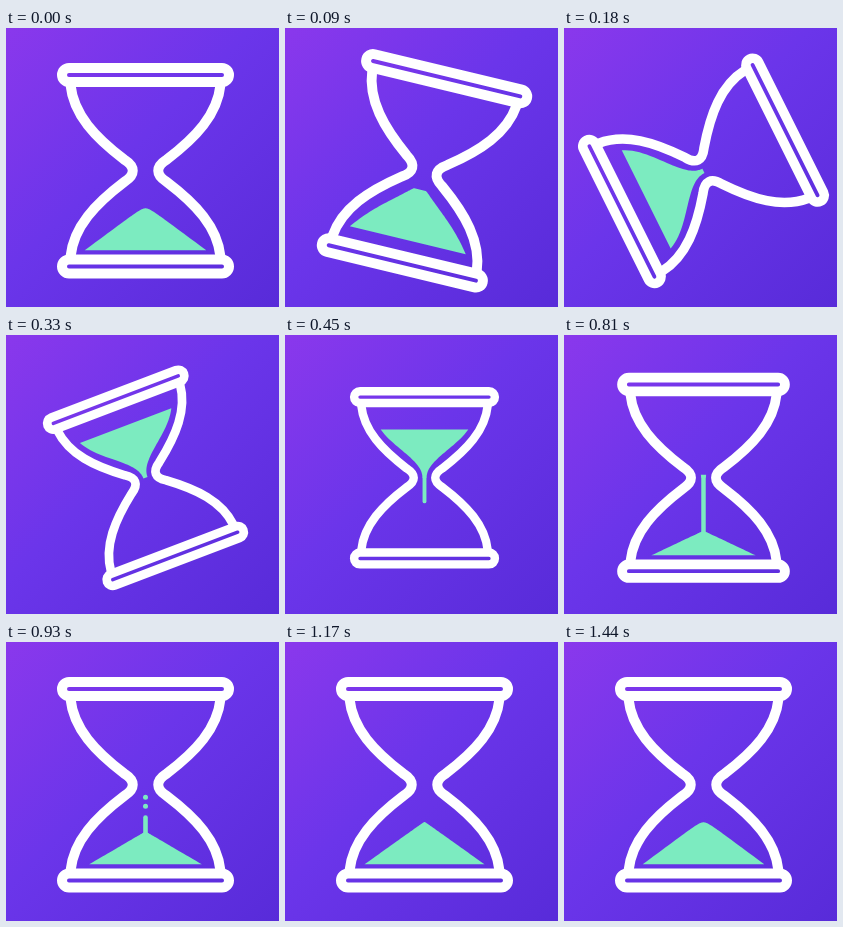
These frames come from a looping animation (273 px wide and 279 px high, 1.47 s). An HTML page:

```html
<!DOCTYPE html>
<html lang="en">
<head>
<meta charset="utf-8">
<title>Hourglass</title>
<style>
  html, body { margin: 0; width: 100%; height: 100%; overflow: hidden; }
  body { background: linear-gradient(135deg, #8a38ec, #6b35ea 45%, #582bd9); }
  svg { display: block; width: 100%; height: 100%; }
  .glass { fill: none; stroke: #fff; stroke-width: 10; }
  .sand { fill: #7cebc0; }
  #stream { stroke: #7cebc0; stroke-width: 4.6; stroke-linecap: round; }
</style>
</head>
<body>
<svg viewBox="0 0 273 279">
  <defs>
    <path id="side" d="M-75-86C-72-56-50-33-21-11C-10-4-10 4-21 11C-50 33-72 56-75 86"/>
    <rect id="bar" x="-83.5" y="-102.7" width="167" height="14" rx="7"/>
  </defs>
  <g id="timer">
    <path id="upper" class="sand"/>
    <path id="pile" class="sand"/>
    <line id="stream" x1="0" x2="0"/>
    <circle class="sand dot" r="2.5"/>
    <circle class="sand dot" r="2.5"/>
    <g class="glass">
      <use href="#side"/>
      <use href="#side" transform="scale(-1 1)"/>
      <use href="#bar"/>
      <use href="#bar" transform="scale(1 -1)"/>
    </g>
  </g>
</svg>
<script>
const LOOP = 1470, STEP = 30;
const HEIGHT = 45.5, BASE = 79.5, ROUND = 3.5;
const $ = id => document.getElementById(id);
const dots = document.querySelectorAll('.dot');

const part = (t, a, b) => Math.min(1, Math.max(0, (t - a) / (b - a)));
const ease = (t, a, b) => { const u = part(t, a, b); return u * u * (3 - 2 * u); };
const mix = (a, b, u) => a + (b - a) * u;
const show = (el, on) => el.setAttribute('visibility', on ? 'visible' : 'hidden');

// Half width of the sand room at distance y from the neck
const room = y => 2.5 + 61 * (1 - Math.exp(-Math.pow(Math.max(0, y) / 45, 2.1)));

// Half width of a heap with its tip at a, rounded by r
function heap(y, a, r, base, half) {
  const d = y - a;
  return half * Math.sqrt(Math.max(0, d * d - r * r)) / (base - a);
}

// Symmetric outline between two heights
function outline(from, to, width, sign) {
  const left = [], right = [], n = 40;
  for (let i = 0; i <= n; i++) {
    const u = i / n, y = mix(from, to, u * u), w = width(y);
    left.push(`${(-w).toFixed(2)} ${(sign * y).toFixed(2)}`);
    right.unshift(`${w.toFixed(2)} ${(sign * y).toFixed(2)}`);
  }
  return 'M' + left.concat(right).join('L') + 'Z';
}

function drawUpper(t) {
  const level = t < 330
    ? 64 + 15.5 * (1 - t / 330) ** 2
    : 64 - 38.5 * ((t - 330) / 360) ** 1.6;
  show($('upper'), level > 0);
  if (level <= 0) return;
  const m = ease(t, 0, 185);
  const tip = (BASE - HEIGHT) * (1 - m), r = ROUND * (1 - m);
  const width = y => mix(heap(y, tip, r, level, 61), room(y), m);
  $('upper').setAttribute('d', outline(tip + r, level, width, -1));
}

function drawPile(t) {
  const h = HEIGHT * (1 - (1 - part(t, 525, 1380)) ** 2);
  const tip = BASE - h;
  show($('pile'), h > 0);
  if (h > 0) {
    const half = (61 - 11 * (HEIGHT - h) / 29.5) * part(t, 515, 590);
    const r = Math.min(h / 2, ROUND * ease(t, 1080, 1440));
    $('pile').setAttribute('d', outline(tip + r, BASE, y => heap(y, tip, r, BASE, half), 1));
  }
  return tip;
}

function drawStream(t, tip) {
  const end = Math.min(28 * (Math.max(0, t - 330) / 120) ** 2.1, tip + 3);
  const fall = wait => 32.8 * (Math.max(0, t - 825 - wait) / 105) ** 2;
  const top = fall(0);
  show($('stream'), t >= 330 && top < end);
  $('stream').setAttribute('y1', top);
  $('stream').setAttribute('y2', end);
  dots.forEach((dot, i) => {
    const y = fall(20 * (i + 1));
    show(dot, y > 0 && y < tip);
    dot.setAttribute('cy', y);
  });
}

function draw(t) {
  const turn = 180 * ease(t, 25, 412) - 180;
  const size = 1 - 0.157 * (ease(t, 25, 450) - ease(t, 450, 930));
  $('timer').setAttribute('transform', `translate(139.5 142.8) rotate(${turn}) scale(${size})`);
  drawUpper(t);
  drawStream(t, drawPile(t));
}

const start = performance.now();
function tick() {
  const t = (performance.now() - start) % LOOP;
  draw(Math.floor(t / STEP) * STEP);
  requestAnimationFrame(tick);
}
tick();
</script>
</body>
</html>
```
